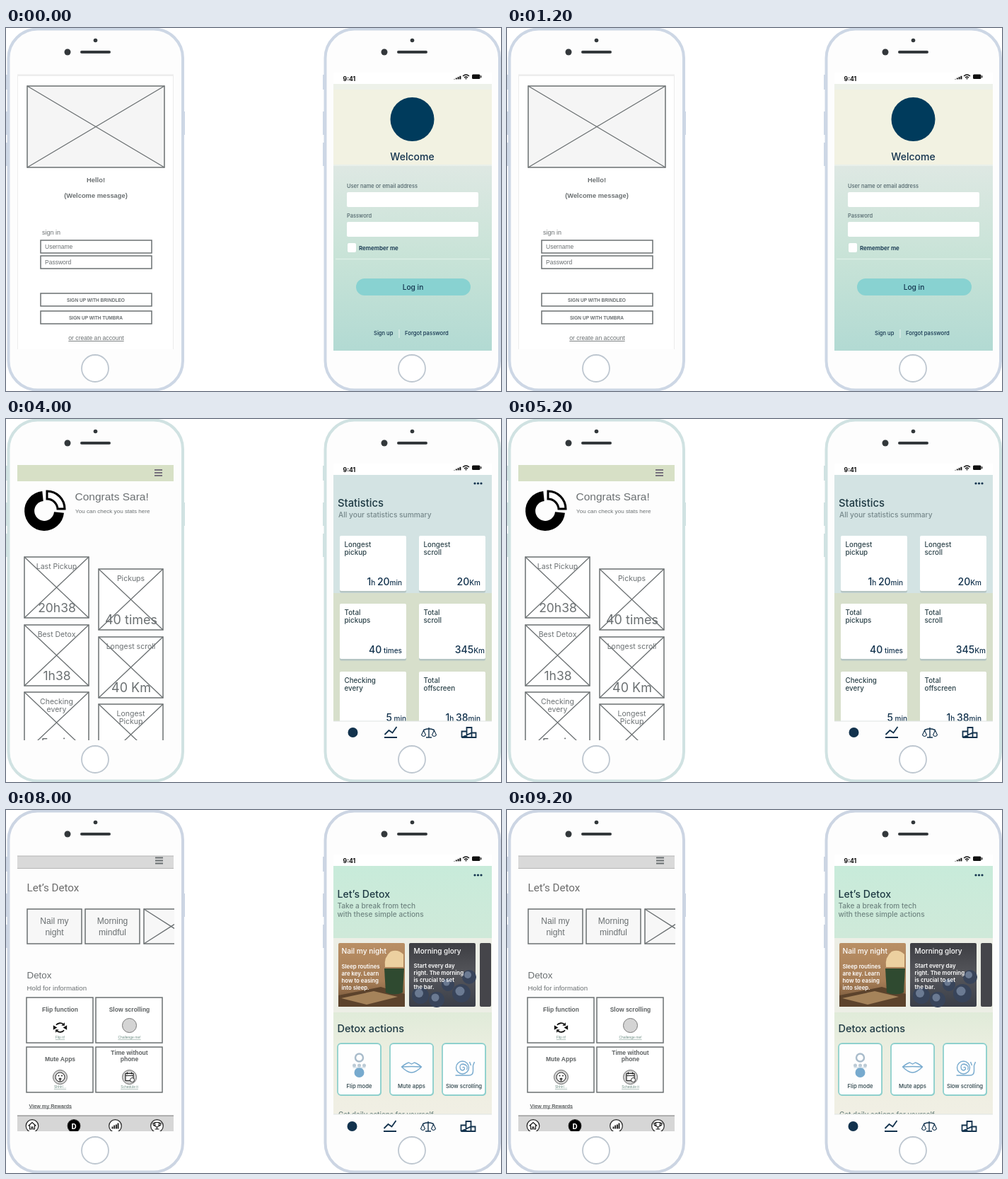
Animation of 700x513 px, one loop 10000 ms. Source, as an HTML page:

```html
<!DOCTYPE html>
<html lang="en">
<head>
<meta charset="utf-8">
<title>Wireframes and final screens</title>
<style>
html, body { margin: 0; width: 100%; height: 100%; overflow: hidden; background: #fff; }
svg { display: block; width: 700px; height: 513px; }
.wire { font-family: "Liberation Sans", Arial, sans-serif; }
.robo { font-family: Roboto, Arial, sans-serif; }
.app { font-family: Inter, sans-serif; font-weight: 500; }
text { white-space: pre; }
</style>
</head>
<body>
<svg id="stage" viewBox="0 0 700 513"></svg>
<script>
const NAVY = '#12324d', GREY = '#6b7072', ORANGE = '#f7c173';
const B = 'font-weight="700" ', MID = 'text-anchor="middle" ', END = 'text-anchor="end" ';

const text = (x, y, s, size, fill = GREY, extra = '') =>
  `<text x="${x}" y="${y}" font-size="${size}" fill="${fill}" ${extra}>${s}</text>`;
const lines = (x, y, step, list, size, fill, extra) =>
  list.map((s, i) => text(x, y + i * step, s, size, fill, extra)).join('');
const rect = (x, y, w, h, fill, extra = '') =>
  `<rect x="${x}" y="${y}" width="${w}" height="${h}" fill="${fill}" ${extra}/>`;
const path = (d, stroke, width = 1.5, fill = 'none', extra = '') =>
  `<path d="${d}" stroke="${stroke}" stroke-width="${width}" fill="${fill}" ${extra}/>`;
const shape = (d, fill) => path(d, 'none', 0, fill);
const disc = (x, y, r, fill, extra = '') =>
  `<circle cx="${x}" cy="${y}" r="${r}" fill="${fill}" ${extra}/>`;
const line = (c, w = 1.5) => `stroke="${c}" stroke-width="${w}"`;
const at = (x, y, s) => `<g transform="translate(${x} ${y})">${s}</g>`;
const group = (cls, s) => `<g class="${cls}">${s}</g>`;
const fade = (id, ...stops) => `<linearGradient id="${id}" x2="0" y2="1">` +
  stops.map(([o, c, a = 1]) => `<stop offset="${o}" stop-color="${c}" stop-opacity="${a}"/>`).join('') +
  '</linearGradient>';

const frameBox = (x, y, w, h, fill = 'none') => rect(x, y, w, h, fill, line(GREY));
const crossBox = (x, y, w, h, fill = '#f7f7f7') => frameBox(x, y, w, h, fill) +
  path(`M${x},${y}l${w},${h}M${x},${y + h}l${w},${-h}`, GREY, 1.3);
const burger = (x, y, c = GREY) => path(`M${x - 5.5},${y - 4}h11m-11,4h11m-11,4h11`, c, 1.8);
const dots = y => [663, 667.5, 672].map(x => disc(x, y, 1.6, NAVY)).join('');

// Both device shells share one outline.
function shell(x, edge) {
  return at(x, 0,
    path('M1,66v21M1,118v33M1,162v33M252,118v33', edge, 2) +
    rect(3.5, 1.5, 246.5, 510, '#fdfdfd', `rx="41" ${line(edge, 4)}`) +
    disc(126.5, 17.5, 2.8, '#33383b') + disc(87, 34, 4.5, '#33383b') +
    path('M107,34h39', '#33383b', 4, 'none', 'stroke-linecap="round"') +
    disc(126, 481, 19, '#fff', line('#bec7d0', 1.8)));
}

function status() {
  const bars = [0, 1, 2, 3].map(i => rect(633 + i * 2.8, 72 - i * 1.4, 2, 2.4 + i * 1.4 - 2, '#111')).join('');
  return rect(463, 63, 224, 16, '#fff') + text(476.5, 74.5, '9:41', 8.7, '#111', B) + at(0, 0, bars) +
    path('M646,68q4.5,-4 9,0M648,70.2q2.5,-2.2 5,0', '#111', 1.4) + disc(650.5, 71.5, 1, '#111') +
    rect(659, 65.5, 11.5, 6.5, '#111', 'rx="1.6"') + rect(671.2, 67.3, 1.2, 3, '#111');
}

// Bottom bar of the finished app; y is the baseline of the icons.
function appNav(y, x = 0, top = 427) {
  return rect(463, top, 224, 30, '#fdfdfd') + path(`M463,${top}h224`, '#dfe4e2', 1) +
    disc(490.5 + x, y - 7, 7, NAVY) +
    at(x, y, path('M535,0h18M535.5,-4l6,-6l5,3.5l6,-8.500', NAVY, 1.8) +
      path('M598,-14v14M594,0h8M590.5,-10.500q7.500,-3.500 15,0', NAVY, 1.4) +
      path('M587.5,-3.5l3,-6.500l3,6.500q-3,4 -6,0zM602.5,-3.5l3,-6.500l3,6.500q-3,4 -6,0z', NAVY, 1.1) +
      path('M644.5,0v-8.500h7v-5.500h7v14M651.5,-8.500v8.500M658.5,-6.500h6v6.500h-20z', NAVY, 1.8));
}

const donut = path('M75,132A21,21 0 1 1 52,109', '#000', 14) +
  path('M58,102A25,25 0 0 1 83,127H73A15,15 0 0 0 58,113Z', '#000', 3, '#fff');

const flipIcon = (x, y, c) => `<g transform="translate(${x} ${y}) scale(.92)">` +
  path('M-6,-4a7,6 0 0 1 11,-1M6,4a7,6 0 0 1 -11,1', c, 2) +
  shape('M7,-8v5h-5zM-7,8v-5h5zM-10.5,-3.5v7l6,-3.5zM10.5,-3.5v7l-6,-3.5z', c) + '</g>';

const wireTop = () => rect(16, 65, 221, 17, '#d9d9d9') +
  path('M16,65h221M16,82.5h221', '#b4b4b4', 1) + burger(216.5, 71.5);

function wireNav(active) {
  const ink = i => i === active ? '#fff' : '#111';
  const icons = [
    path('M-5.5,0l5.5,-5l5.5,5M-3.5,-1v5.5h2.5v-3h2v3h2.5v-5.5', ink(0), 1.2),
    text(0, 4, 'D', 11, ink(1), B + MID),
    path('M-4,4v-3M-1.3,4v-5M1.4,4v-6M4,4v-8', ink(2), 1.8),
    path('M-3,-5h6v4q-3,5 -6,0zM-3,-4h-2.5q0,4 3,4M3,-4h2.5q0,4 -3,4M0,1v3M-3,4.5h6', ink(3), 1.2)
  ];
  return rect(16, 432, 221, 22, '#d6d6d6') + path('M16,432h221', '#777', 1) +
    icons.map((s, i) => at([37, 96, 154.5, 213.5][i], 446.5,
      disc(0, 0, 8.8, i === active ? '#000' : '#fff', line('#222', 1.2)) + s)).join('');
}

function loginWire() {
  const field = (y, s) => frameBox(49, y, 157, 18) + text(55, y + 12, s, 8.5);
  const button = (y, s) => frameBox(49, y, 157, 18) + text(127, y + 11.5, s, 6.6, GREY, B + MID);
  return group('wire', rect(16.5, 66, 220, 390, '#fff', line('#ececec', 1)) + path('M16,67h221', '#ededed', 2) +
    crossBox(30, 82, 194, 115, '#f5f5f5') +
    text(127, 218, 'Hello!', 9.4, GREY, B + MID) + text(127, 240, '(Welcome message)', 9.35, GREY, B + MID) +
    text(51, 292, 'sign in', 9) + field(300, 'Username') + field(322, 'Password') +
    button(375, 'SIGN UP WITH BRINDLEO') + button(400, 'SIGN UP WITH TUMBRA') +
    text(127.5, 441, 'or create an account', 8.6, GREY, MID + 'text-decoration="underline"'));
}

function loginApp() {
  const c = '#52666c';
  return group('app', rect(463, 79, 224, 115, '#f2f2e2') + rect(463, 79, 224, 8, '#edf1e9') +
    rect(463, 193, 224, 263, 'url(#mint)') + path('M463,194h224', '#e9f0ea', 2) + path('M466,326.5h218', '#dceee5', 1.6) +
    disc(574.5, 129, 31, '#003b5c') + text(574.5, 187, 'Welcome', 14, NAVY, MID) +
    text(482, 226, 'User name or email address', 7.5, c) + rect(482, 232, 186, 21, '#fff', 'rx="2"') +
    text(482, 268, 'Password', 7.5, c) + rect(482, 274, 186, 21, '#fff', 'rx="2"') +
    rect(483, 304, 12, 13, '#fff', 'rx="2"') + text(499, 313.5, 'Remember me', 8, NAVY, 'font-weight="600"') +
    rect(495, 354, 162, 24, '#88d2d1', 'rx="12"') + text(575.5, 369.5, 'Log in', 10.2, NAVY, MID) +
    text(520, 434, 'Sign up', 7.6, NAVY) + path('M556,426v12', '#e8f3ee', 1) +
    text(564, 434, 'Forgot password', 7.7, NAVY) + status());
}

function homeWire() {
  const pill = (x, w, s) => rect(x, 189, w, 9, '#fbfcf5', `rx="3" ${line('#a9b28a', 1)}`) +
    text(x + w / 2, 195, s, 4.6, '#8b936f', MID);
  return group('wire', path('M16,67h221', '#f0f0e2', 2) + crossBox(16.5, 77, 220.5, 130, '#f5f5f5') + burger(215.5, 103.5) +
    text(30, 126.5, 'Hello Sara!', 8.9) + text(30, 137.5, 'It’s Time For Your Tech Check', 9.05) +
    pill(31, 51, 'Total pickups today') + pill(88, 51, 'Time off screen today') +
    pill(145, 54, 'Kilometers of scroll today') + pill(205, 51, 'Longest time') +
    flipIcon(210.5, 220, GREY) + text(210.5, 222, 'Flip', 4.5, GREY, MID + B) +
    crossBox(30, 233, 191, 112) + text(127.5, 285, '« PHONE OFF', 14.2, GREY, B + MID) +
    text(127, 302, 'LIFE ON »', 14.2, GREY, B + MID) +
    crossBox(30, 354, 91, 112) + crossBox(130, 354, 91, 112) +
    text(39, 371, 'Inspiration 1', 8.8) + text(139.5, 371, 'Inspiration 2', 8.8));
}

function homeApp() {
  const stats = [['Total pickups today', '20 times'], ['Time off screen today', '4 hours'],
    ['Km of scroll today', '0.20 km'], ['Longest time on screen', '30 min']];
  return group('app', rect(463, 79, 224, 24, '#cbcfdf') + dots(90) + rect(463, 103, 224, 250, 'url(#sand)') +
    text(470.5, 121, 'HELLO SARA,', 7.6, '#26373b') +
    lines(470.5, 145, 17, ['It’s time for your', 'tech check'], 14.2, '#173640') +
    stats.map(([k, v], i) => text(470.5, 202 + i * 29, k, 9.8, '#26373b') +
      text(609.5, 201 + i * 29.3, v, 14, NAVY)).join('') +
    shape('M463,456V328Q464,307 486,307H664Q686,307 687,328V456Z', '#fdfdf8') +
    path('M564,316.5h21', ORANGE, 3, 'none', 'stroke-linecap="round"') +
    disc(666, 328, 4, 'none', line(NAVY, 1.8)) + path('M669,331l4,4', NAVY, 2) +
    text(470.5, 358, 'Your inspiration', 14.1, '#1f363e') +
    rect(470, 368, 210, 62, 'url(#dusk)', 'rx="3"') +
    shape('M570,368h110v56h-70q-8,-22 8,-30q-30,-8 -48,-26z', '#e9b069') +
    shape('M508,424q4,-6 12,-5q2,-5 7,-3q6,2 7,8z', '#4a4038') +
    lines(479.5, 383, 11.5, ['Your life is what', 'you pay attention to.'], 9.9, '#fff8ea') +
    appNav(447, 0, 424) + status());
}

function statsWire() {
  const box = (x, y, title, value, size = 17.5) => crossBox(x, y, 91, 86, '#fff') +
    lines(x + 45.5, y + 17, 11, title, 10.5, GREY, MID) + text(x + 46, y + 78, value, size, GREY, MID);
  return group('wire', rect(16, 65, 221, 23, '#d7e0c6') + burger(215.5, 76, '#77727d') + donut +
      text(97.5, 115, 'Congrats Sara!', 15.5) + text(98, 132.5, 'You can check you stats here', 8.1)) +
    group('app', `<g font-weight="400">${
      box(26, 195, ['Last Pickup'], '20h38') + box(26, 291, ['Best Detox'], '1h38') +
      box(26, 386, ['Checking', 'every'], '5 min') + box(131, 212, ['Pickups'], '40 times', 18) +
      box(131, 308, ['Longest scroll'], '40 Km', 18) + box(131, 403, ['Longest', 'Pickup'], '1h20')}</g>`);
}

function statsApp() {
  const unit = s => `<tspan font-size="10">${s}</tspan>`;
  const card = (x, y, title, value, end) => rect(x, y + 2.5, 94, 78, '#b5c5c3', 'rx="2"') +
    rect(x, y, 94, 78, '#fff', 'rx="2"') + lines(x + 6.5, y + 16, 11, title, 9.8, '#2a4148') +
    text(end, y + 70, value, 14, NAVY, END);
  return group('app', rect(463, 79, 224, 167, '#d3e3e3') + rect(463, 246, 224, 184, '#d7dfcb') + dots(91) +
    text(469, 123.5, 'Statistics', 14.8, '#1f3a44') + text(470, 139, 'All your statistics summary', 10.2, '#75878a') +
    card(472, 165, ['Longest', 'pickup'], '1' + unit('h ') + '20' + unit('min'), 560) +
    card(584, 165, ['Longest', 'scroll'], '20' + unit('Km'), 671) +
    card(472, 261, ['Total', 'pickups'], '40' + unit(' times'), 560) +
    card(584, 261, ['Total', 'scroll'], '345' + unit('Km'), 677) +
    card(472, 357, ['Checking', 'every'], '5' + unit(' min'), 566) +
    card(584, 357, ['Total', 'offscreen'], '1' + unit('h ') + '38' + unit('min'), 671) +
    appNav(450) + status());
}

function weekWire() {
  const ring = (c, i) => at(46 + i * 28.8, 146,
    `<g transform="scale(-.42 .42) translate(-54 -130)">${donut}</g>` + text(0, 3.8, c, 10, '#111', B + MID));
  const bullet = (x, y, s) => at(x, y, disc(0, 0, 5.5, '#eee', line('#222', 1)) +
    path('M-3.8,-3.8l7.6,7.6M3.8,-3.8l-7.6,7.6', '#222', 1)) + text(x + 8.3, y + 3, s, 8.5, '#222');
  const pair = (x, y, a, b) => text(x, y, a, 8.3, '#555') + text(x, y + 8.5, b, 8.5, '#8a8a8a');
  return group('wire', wireTop() + path('M36.5,105l-5,5l5,5', '#555', 2.2) +
      [...'MTWTFSS'].map(ring).join('') +
      pair(34, 182, '10 minutes', 'Daily Avg') + pair(34, 211, '5 seconds', 'The shortest') +
      pair(107, 211, '1 hour', 'The longest') + text(34, 258, 'Your week', 8.7, '#555') +
      path('M35,264V337H218', '#111', 1.6) +
      path('M40,267C45,271 48,286 52,292S62,303 75,303C83,301 84,290 90,283S104,271 111,271C119,273 122,281 126,288S140,313 149,314S166,311 173,306S184,287 198,287H221', '#111', 1.6) +
      [39, 68, 97, 126, 153, 182, 211].map((x, i) => text(x, 348, '0' + i, 8, '#222', B + MID)).join('')) +
    group('robo', text(53.5, 115.5, 'Longest Pickup', 14, '#6d6d6d') +
      text(34, 374, 'Longest pickup at a glance', 8.6, '#222', 'font-weight="500"') +
      bullet(42, 392.5, '80% on Pondalory') + bullet(140.5, 392.5, '2% text messages') +
      bullet(42, 413.5, '10% emails') + bullet(140.5, 413.5, '8% Tumbra Vessel') + wireNav(2));
}

function weekApp() {
  const wave = 'M486,287C500,283 510,289 517,301S532,314 540,310S553,298 563,298S579,313 589,314C607,313 610,263 638,263C658,263 659,290 678,290';
  const pair = (y, a, b) => text(483, y, a, 10, '#33454a') + text(483, y + 12, b, 9.8, '#858d8c');
  return group('app', rect(463, 79, 224, 350, 'url(#lagoon)') + dots(91) + text(469.5, 124, 'Statistics', 14.8, '#1f3a44') +
    rect(471, 136, 211, 300, '#b9d3c8', 'rx="3" opacity=".6"') + rect(473, 138, 207, 300, 'url(#paper)', 'rx="3"') +
    path('M651,149l8.5,8.5m0,-8.5l-8.5,8.5', ORANGE, 2.4) +
    text(482.5, 171, 'Longest pickup', 10.1, '#22363c') +
    lines(483, 188, 11, ['Let’s zoom in when you used', 'your phone the longest'], 8.8, '#82898a') +
    rect(484, 219, 82, 18, '#fff', `rx="2" ${line(ORANGE, 1.6)}`) + text(488, 231.5, 'Sort by week', 9.7, NAVY, 'font-weight="600"') +
    shape('M552.5,226.5h8.5l-4.25,6z', ORANGE) +
    shape(wave + 'V331H486Z', 'url(#glow)') + path('M483,254V331.5H679', '#c9cbc7', 1.3) +
    path(wave, ORANGE, 1.6) + disc(589, 314, 2.4, ORANGE, line('#fff', 1)) +
    rect(568, 277, 40, 19, '#dfe2dc') + rect(567, 276, 40, 18, '#fff', 'rx="1"') +
    text(587.5, 288.5, '15 min', 8.4, NAVY, MID + 'font-weight="600"') +
    [...'SMTWTFS'].map((c, i) => text(487 + i * 30.2, 345, c, 9, '#858d8c', MID)).join('') +
    pair(370, '15 minutes', 'Daily Avg') + pair(404, '5 seconds', 'The shortest') + appNav(451) + status());
}

function detoxWire() {
  const chip = (x, a, b) => frameBox(x, 140, 77, 49, '#f7f7f7') +
    lines(x + 38.5, 160.5, 16.5, [a, b], 12.1, GREY, MID);
  const card = (x, y, title, link, icon) => frameBox(x, y, 94, 64, '#fff') +
    lines(x + 47.5, y + (title.length > 1 ? 11 : 19.5), 8.5, title, 8.5, '#5d6162', B + MID) +
    at(x + 47.5, y + 42.5, icon) + text(x + 47.5, y + 58, link, 5, '#6f8f85', MID + 'text-decoration="underline"');
  const coin = disc(0, 0, 10, '#d4d4d4', line('#666', 1));
  return group('wire', wireTop() + chip(30, 'Nail my', 'night') + chip(112, 'Morning', 'mindful') + crossBox(195, 140, 77, 49) +
    text(29.5, 238, 'Detox', 13.4) + text(29.5, 255, 'Hold for information', 9.7) +
    card(29, 265, ['Flip function'], 'Flip it!', flipIcon(0, 0, '#111')) +
    card(127, 265, ['Slow scrolling'], 'Challenge me!', disc(0, -3, 10, '#d4d4d4', line('#777', 1))) +
    card(29, 335, ['Mute Apps'], 'Shhh!...', coin + disc(0, 0, 6.5, '#fff', line('#222', 1)) +
      disc(-2, -2, 1, '#222') + disc(2.5, -2, 1, '#222') + path('M0,1v5M-2,2.5h4', '#222', 1.3)) +
    card(127, 335, ['Time without', 'phone'], 'Schedule it', coin + rect(-5.5, -5, 11, 10, '#fff', line('#222', 1.2)) +
      path('M-5.5,-2h11M-3,-7v3M3,-7v3', '#222', 1.2) + disc(4, 4, 3, '#fff', line('#222', 1))) +
    text(32.5, 420.5, 'View my Rewards', 7.2, '#5d6162', B + 'text-decoration="underline"')) +
    group('robo', text(29.5, 115, 'Let’s Detox', 15.2, '#6d6d6d') + wireNav(1));
}

function detoxApp() {
  const blue = '#77aace', bold = 'font-weight="600"';
  const action = (x, s, icon) => rect(x + 1, 331, 61, 73, '#8ed0cd', 'rx="5"') +
    rect(x, 330, 61, 73, '#fefefe', `rx="5" ${line('#8ed0cd', 1.8)}`) +
    text(x + 30.5, 392.5, s, 7.7, '#2a4148', MID) + at(x + 30.5, 364, icon);
  const berries = [[586, 262, 12], [609, 268, 11], [644, 259, 13], [655, 236, 10], [625, 247, 9]]
    .map(([x, y, r]) => disc(x, y, r, '#38445a') + disc(x - 2, y - 3, r * .5, '#6b7a92')).join('');
  const lips = path('M-14,-1Q-8,-6 -4,-7L0,-5L4,-7Q8,-6 14,-1Q6,7 0,7Q-6,7 -14,-1ZM-14,-1Q0,-2 14,-1', blue, 1.3);
  const snail = path('M-12,11h19q6,0 6,-6v-8M10,-3l-2,-5M13,-3l2,-5', blue, 1.4) +
    disc(-2, 0, 9, 'none', line(blue, 1.4)) + path('M-2,0q3,-2 3,2q-3,4 -6,0q-2,-7 4,-7q8,2 5,8', blue, 1.3);
  const flip = disc(0, -14, 5.5, '#fff', line('#a9bccb', 2.5)) +
    [-7, 0, 7].map(x => disc(x, -3, 2.5, '#bccbd6')).join('') + disc(0, 7, 7, blue) + path('M-9,0h18', '#c5d5e0', 1);
  return group('app', rect(463, 79, 224, 103, 'url(#leaf)') + rect(463, 181, 224, 106, '#eceee5') +
    rect(463, 286, 224, 150, 'url(#cream)') + dots(92) +
    text(468.5, 124, 'Let’s Detox', 14.1, '#1f3a44') +
    lines(468.5, 139, 12, ['Take a break from tech', 'with these simple actions'], 10.1, '#6f8581') +
    rect(470, 188, 94, 90, 'url(#wood)', 'rx="2"') +
    shape('M536,222q-2,-14 8,-22q10,-4 18,4v18z', '#ecd0a0') +
    shape('M470,262L530,250L564,260V278H470Z', '#5c432c') + shape('M474,266l46,-10l34,8l-44,11z', '#a5835a') +
    shape('M535,224h28l-2,34q-12,5 -24,0z', '#2f4a30') +
    text(474.5, 203, 'Nail my night', 10.2, '#fff') +
    lines(474.5, 224, 10, ['Sleep routines', 'are key. Learn', 'how to easing', 'into sleep.'], 7.8, '#fff', bold) +
    rect(570, 188, 94, 90, 'url(#slate)', 'rx="2"') + berries +
    text(576.5, 203, 'Morning glory', 10, '#fff') +
    lines(576.5, 223, 10, ['Start every day', 'right. The morning', 'is crucial to set', 'the bar.'], 7.9, '#fff', bold) +
    rect(670, 188, 16, 90, '#45454a', 'rx="2"') +
    text(468.5, 314, 'Detox actions', 14.5, '#1f3a44') +
    action(469, 'Flip mode', flip) + action(543, 'Mute apps', lips) + action(617, 'Slow scrolling', snail) +
    text(470, 434, 'Get daily actions for yourself', 9.8, '#6f8581') + appNav(454, -1, 430) + status());
}

const scenes = [
  ['#cdd7e5', loginWire, loginApp],
  ['#ced9de', homeWire, homeApp],
  ['#d0e2e2', statsWire, statsApp],
  ['#ccd5e3', weekWire, weekApp],
  ['#ccd5e3', detoxWire, detoxApp]
];

const stage = document.getElementById('stage');
stage.innerHTML = '<defs><clipPath id="left"><path d="M16,64H238V454H16Z"/></clipPath>' +
  '<clipPath id="right"><path d="M463,62H687V456H463Z"/></clipPath>' +
  fade('mint', [0, '#dee8e3'], [.5, '#c8e3d7'], [1, '#b2dad3']) +
  fade('sand', [0, '#cde7da'], [.43, '#d0e6da'], [.5, '#eeebd9'], [1, '#efefe3']) +
  fade('dusk', [0, '#f6c27a'], [1, '#f2b76e']) +
  fade('lagoon', [0, '#c9ebe6'], [.5, '#d2e8d6'], [1, '#e2e8c9']) +
  fade('paper', [0, '#f7f7f4'], [.6, '#f7f6ea'], [1, '#f6f3dc']) +
  fade('glow', [0, ORANGE, .6], [1, ORANGE, .04]) +
  fade('leaf', [0, '#c8ebda'], [1, '#cfe9d9']) +
  fade('cream', [0, '#e0ebd9'], [.35, '#ebeee0'], [1, '#f1efe4']) +
  fade('wood', [0, '#b98f65'], [.6, '#a67d56'], [1, '#6b4e34']) +
  fade('slate', [0, '#3d3e43'], [.5, '#55565b'], [1, '#3a3e48']) + '</defs>' +
  scenes.map(([edge, wire, app]) => `<g class="scene" display="none">${shell(0, edge)}${shell(448, edge)}` +
    `<g clip-path="url(#left)">${wire()}</g><g clip-path="url(#right)">${app()}</g></g>`).join('');

const views = [...stage.querySelectorAll('.scene')];
function draw() {
  const current = Math.floor(performance.now() / 2000) % views.length;
  views.forEach((v, i) => v.setAttribute('display', i === current ? 'inline' : 'none'));
  requestAnimationFrame(draw);
}
draw();
</script>
</body>
</html>
```
